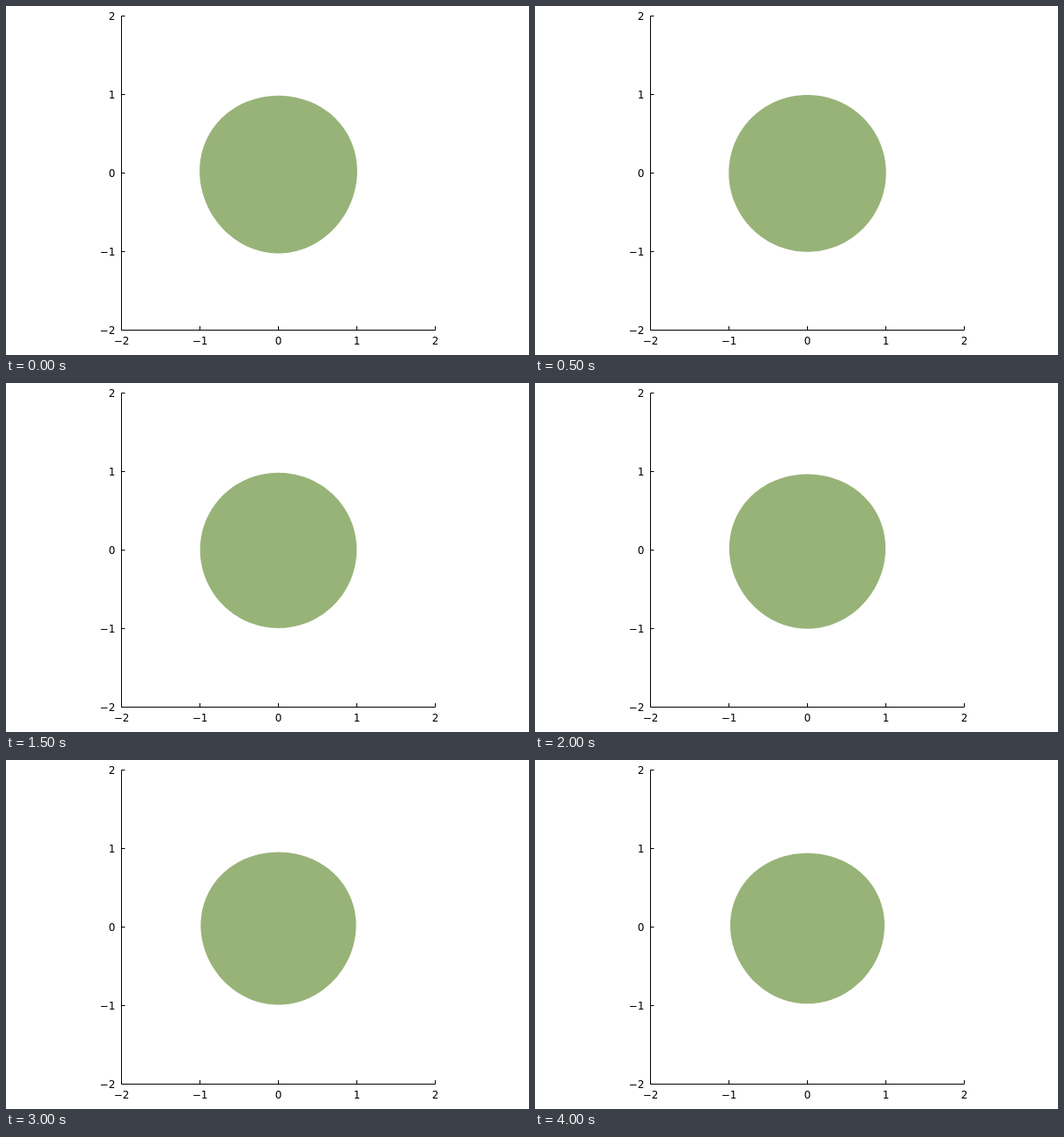
Write an HTML page that moves like this. It is 600 by 400 pixels and loops after 4050 ms.

```html
<!DOCTYPE html>
<html>
<head>
<meta charset="utf-8">
<style>
html, body { margin: 0; width: 100%; height: 100%; overflow: hidden; background: #fff; }
svg { display: block; }
text { font: 12px "DejaVu Sans", sans-serif; }
</style>
</head>
<body>
<svg width="600" height="400">
  <path id="drop" fill="#98b378"/>
  <path id="axes" fill="none" stroke="#000"/>
  <g id="labels"></g>
</svg>
<script>
const CX = 312.5, CY = 191.6, UNIT = 90, STEP = 50, STEPS = 81, POINTS = 180;
const $ = id => document.getElementById(id);

function drawAxes() {
  let d = 'M132.5 11.5V371.5H492.5', labels = '';
  for (let v = -2; v <= 2; v++) {
    const x = 312.5 + v * UNIT, y = 191.5 - v * UNIT;
    const name = String(v).replace('-', '\u2212');
    d += `M${x} 371.5v-4.5M132.5 ${y}h4`;
    labels += `<text x="${x}" y="387.5" text-anchor="middle">${name}</text>` +
      `<text x="125.3" y="${y + 4.5}" text-anchor="end">${name}</text>`;
  }
  $('axes').setAttribute('d', d);
  $('labels').innerHTML = labels;
}

// Axisymmetric drop: Legendre modes 2 and 3 on a slowly shrinking radius
function dropPath(k) {
  const a3 = 0.35 * Math.exp(-0.0015 * k) * Math.sin(Math.PI * k / 10 + 0.02) + 0.01;
  const a2 = -0.0002 * k;
  const a0 = 1.004 - 0.00025 * k - 0.0000014 * k * k - a3 * a3 / 7; // keeps the volume
  const pts = [];
  for (let i = 0; i < POINTS; i++) {
    const th = 2 * Math.PI * i / POINTS, c = Math.cos(th);
    const r = UNIT * (a0 + a2 * (1.5 * c * c - 0.5) + a3 * (2.5 * c ** 3 - 1.5 * c));
    pts.push((CX + r * Math.sin(th)).toFixed(2) + ' ' + (CY + r * c).toFixed(2));
  }
  return 'M' + pts.join('L') + 'Z';
}

const start = performance.now();
function draw() {
  const k = Math.floor(Math.max(0, performance.now() - start) / STEP) % STEPS;
  $('drop').setAttribute('d', dropPath(k));
  requestAnimationFrame(draw);
}
drawAxes();
draw();
</script>
</body>
</html>
```
